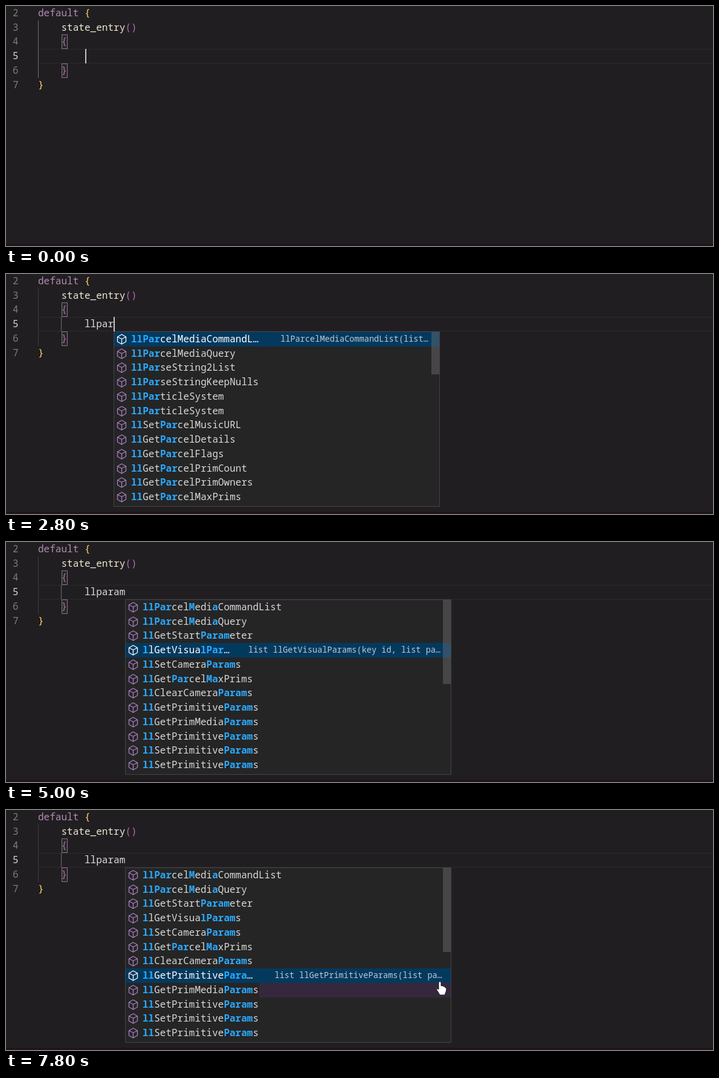
An HTML page with a canvas for the animation above (8 s loop, 1170 by 397 pixels).

```html
<!DOCTYPE html>
<html lang="en">
<head>
<meta charset="utf-8">
<title>Code completion</title>
<style>
html, body { margin: 0; width: 100%; height: 100%; overflow: hidden; background: #211e21; }
canvas { display: block; }
</style>
</head>
<body>
<canvas id="stage" width="1170" height="397"></canvas>
<script>
const ctx = document.getElementById('stage').getContext('2d');
const LOOP = 8000, ROW = 23.75, CHAR = 9.625, TEXT_X = 53, POPUP_Y = 95, LIST_Y = 96;
const FAMILY = '"Noto Sans Mono", "DejaVu Sans Mono", monospace';
const CODE_FONT = `16.04px ${FAMILY}`;
const LABEL_FONT = `500 16px ${FAMILY}`;
const BOLD_FONT = `bold 16px ${FAMILY}`;
const DETAIL_FONT = `500 13.6px ${FAMILY}`;

// Asterisks enclose the matched letters of a suggestion.
const words = text => text.trim().split(/\s+/);
const all = words(`*ll*Abs *ll*Acos *ll*AddToLandBanList *ll*AddToLandPassList
  *ll*AdjustSoundVolume *ll*AllowInventoryDrop *ll*AngleBetween *ll*ApplyImpulse
  *ll*ApplyRotationalImpulse *ll*Asin *ll*Atan2 *ll*AttachToAvatar`);
const afterP = words(`*llP*arcelMediaCommandList *llP*arcelMediaQuery *llP*arseString2List
  *llP*arseStringKeepNulls *llP*articleSystem *llP*articleSystem *llP*assCollisions
  *llP*assTouches *llP*atrolPoints *llP*laySound *llP*laySoundSlave *llP*ow`);
const afterPa = afterP.slice(0, 9).map(s => s.replace('*llP*a', '*llPa*'))
  .concat(words('*llP*l*a*ySound *llP*l*a*ySoundSlave *ll*Set*Pa*yPrice'));
const afterPar = afterPa.slice(0, 6).map(s => s.replace('*llPa*r', '*llPar*'))
  .concat(words(`*ll*Set*Par*celMusicURL *ll*Get*Par*celDetails *ll*Get*Par*celFlags
    *ll*Get*Par*celPrimCount *ll*Get*Par*celPrimOwners *ll*Get*Par*celMaxPrims`));
const afterParam = words(`*llPar*cel*M*edi*a*CommandList *llPar*cel*M*edi*a*Query
  *ll*GetStart*Param*eter *l*lGetVisua*lParam*s *ll*SetCamera*Param*s *ll*Get*Par*cel*Ma*xPrims
  *ll*ClearCamera*Param*s *ll*GetPrimitive*Param*s *ll*GetPrimMedia*Param*s
  *ll*SetPrimitive*Param*s *ll*SetPrimitive*Param*s *ll*SetPrimitive*Param*s`);
const afterPara = afterParam.map(s =>
  s.replace('*M*', 'M').replace('*Ma*', 'M*a*').replace('Param*', 'Para*m'));

// Signature beside the selected row; cut ones give the label length and left offset.
const details = {
  llAbs: { text: 'integer llAbs(integer val)' },
  llParcelMediaCommandList: { text: 'llParcelMediaCommandList(list…', keep: 21, x: 276 },
  llParcelMediaQuery: { text: 'list llParcelMediaQuery(list query)' },
  llGetStartParameter: { text: 'integer llGetStartParameter()' },
  llGetVisualParams: { text: 'list llGetVisualParams(key id, list pa…', keep: 14, x: 204 },
  llSetCameraParams: { text: 'llSetCameraParams(list rules)' },
  llGetParcelMaxPrims: { text: 'integer llGetParcelMaxPrims(vector …', keep: 16, x: 226 },
  llClearCameraParams: { text: 'llClearCameraParams()' },
  llGetPrimitiveParams: { text: 'list llGetPrimitiveParams(list pa…', keep: 18, x: 247.5 }
};

const typing = [
  [0, ''], [800, 'l'],
  [1000, 'l', all.map(s => s.replace('*ll*', '*l*l')), 20],
  [1200, 'll', all, 20], [1800, 'llp', afterP, 24], [2600, 'llpa', afterPa, 40],
  [2800, 'llpar', afterPar, 70], [3000, 'llpara', afterPara, 120], [3200, 'llparam', afterParam, 139]
];
const selection = [[0, 0], [4400, 1], [4800, 2], [5000, 3], [5200, 4], [5400, 5], [5600, 6], [6000, 7]];
const caretOff = [[400, 800], [2400, 2600], [3800, 4200], [4600, 5200], [5600, 6200], [6600, 7200], [7600, 8000]];

const at = (steps, t) => steps.filter(s => s[0] <= t).pop();

function rect(x, y, w, h, color) {
  ctx.fillStyle = color;
  ctx.fillRect(x, y, w, h);
}

function frame(x, y, w, h, color) {
  ctx.strokeStyle = color;
  ctx.lineWidth = 1;
  ctx.strokeRect(x + .5, y + .5, w - 1, h - 1);
}

function write(text, x, y, color, font = CODE_FONT, align = 'left') {
  ctx.font = font;
  ctx.textAlign = align;
  ctx.fillStyle = color;
  ctx.fillText(text, x, y);
}

const lineTop = n => 71 + (n - 5) * ROW;
const baseline = n => Math.round(lineTop(n) + 17);
const caretX = typed => 130.9 + typed.length * 9.45;
const code = (text, line, col, color) => write(text, TEXT_X + col * CHAR, baseline(line), color);

function drawEditor(t, typed) {
  rect(0, 0, 1170, 397, '#211e21');
  rect(0, 393, 1170, 4, '#20151c');
  rect(TEXT_X, 71, 1117, 1, '#2d2a2e');
  rect(TEXT_X, 94, 1117, 1, '#2d2a2e');

  const settled = t >= 200;
  rect(53, 24, 1, 95, settled ? '#413e42' : '#74667a');
  if (settled) rect(91, 71, 1, 24, '#74667a');

  for (let n = 2; n <= 7; n++)
    write(n, 20.5, baseline(n), n === 5 ? '#d6d4d6' : '#7d7a7e', CODE_FONT, 'right');

  const purple = '#b669b6', yellow = '#ffdc64';
  code('default', 2, 0, '#b08bb1');
  code('{', 2, 8, yellow);
  code('state_entry', 3, 4, '#ece8d3');
  code('()', 3, 15, purple);
  for (const [n, brace] of [[4, '{'], [6, '}']]) {
    const y = Math.round(lineTop(n));
    rect(92, y, 10, 24, '#29262a');
    frame(92, y, 10, 24, '#807d81');
    code(brace, n, 4, purple);
  }
  code('}', 7, 0, yellow);
  code(typed, 5, 8, '#dcdadc');

  if (!caretOff.some(([from, to]) => t >= from && t < to))
    rect(Math.round(caretX(typed)), 71, 2, 24, '#c6c4c6');
}

function drawCube(x, y, color) {
  ctx.strokeStyle = color;
  ctx.lineWidth = 1.3;
  ctx.lineJoin = 'round';
  ctx.beginPath();
  ctx.moveTo(x, y - 8);
  for (const [dx, dy] of [[7, -4], [7, 4], [0, 8], [-7, 4], [-7, -4]]) ctx.lineTo(x + dx, y + dy);
  ctx.closePath();
  ctx.moveTo(x - 7, y - 4);
  ctx.lineTo(x, y - .5);
  ctx.lineTo(x + 7, y - 4);
  ctx.moveTo(x, y - .5);
  ctx.lineTo(x, y + 8);
  ctx.stroke();
}

function drawLabel(marked, x, y, color, keep = Infinity) {
  let used = 0;
  const put = (text, bold) => {
    write(text, x, y, bold ? '#2aaaff' : color, bold ? BOLD_FONT : LABEL_FONT);
    x += ctx.measureText(text).width;
  };
  marked.split('*').forEach((part, i) => {
    const text = part.slice(0, Math.max(0, keep - used));
    used += text.length;
    if (text) put(text, i % 2 === 1);
  });
  if (keep < Infinity) put('…', false);
}

function drawPopup(t, typed, items, thumb) {
  const anchor = caretX(typed), x = Math.floor(anchor);
  const selected = at(selection, t)[1];
  const hover = t >= 7600 ? 8 : -1;
  const rowTop = i => Math.round(LIST_Y + i * ROW - .01);
  rect(x, POPUP_Y, 540, 290, '#252526');

  items.forEach((item, i) => {
    const top = rowTop(i), height = rowTop(i + 1) - top;
    const y = top + 17, active = i === selected;
    const detail = active ? details[item.replaceAll('*', '')] || {} : {};
    if (active) rect(x + 1, top, 538, height, '#04395e');
    if (i === hover) rect(x + 222, top, 317, height, '#35283d');
    drawCube(Math.round(anchor + 13.3) + .5, top + 12, active ? '#ffffff' : '#a880c2');
    drawLabel(item, Math.round(anchor + 29.3), y, active ? '#ffffff' : '#d8d8d8', detail.keep);
    if (detail.text) {
      const cut = detail.keep;
      write(detail.text, anchor + (cut ? detail.x : 525), y - 1, '#bccad4', DETAIL_FONT, cut ? 'left' : 'right');
    }
  });

  rect(Math.round(anchor + 526.3), LIST_Y, 13, thumb, 'rgba(121,121,121,.4)');
  frame(x, POPUP_Y, 540, 290, '#444246');
}

function drawHand(x, y) {
  ctx.save();
  ctx.translate(x, y);
  ctx.beginPath();
  ctx.moveTo(4, 2);
  ctx.quadraticCurveTo(6, -1, 8, 2);
  ctx.lineTo(8, 8);
  ctx.quadraticCurveTo(12, 7, 12, 9);
  ctx.quadraticCurveTo(15, 8, 15, 11);
  ctx.quadraticCurveTo(17, 10, 17, 13);
  ctx.lineTo(16, 18);
  ctx.lineTo(14, 23);
  ctx.lineTo(6, 23);
  ctx.lineTo(.5, 14);
  ctx.quadraticCurveTo(1, 11, 4, 14);
  ctx.closePath();
  ctx.fillStyle = '#ffffff';
  ctx.strokeStyle = '#18161a';
  ctx.lineWidth = 1;
  ctx.fill();
  ctx.stroke();
  ctx.restore();
}

function drawMouse(t) {
  if (t < 7400) return;
  if (t >= 7600) return drawHand(t < 7800 ? 716 : 712, t < 7800 ? 286 : 283);
  rect(814, 318, 1, 17, '#d8d8d8');
  rect(811, 317, 7, 1, '#d8d8d8');
  rect(811, 335, 7, 1, '#d8d8d8');
}

function draw(now) {
  const t = now % LOOP;
  const [, typed, items, thumb] = at(typing, t);
  drawEditor(t, typed);
  if (items) drawPopup(t, typed, items, thumb);
  drawMouse(t);
}

const start = performance.now();
function tick() {
  draw(performance.now() - start);
  requestAnimationFrame(tick);
}
tick();
</script>
</body>
</html>
```
